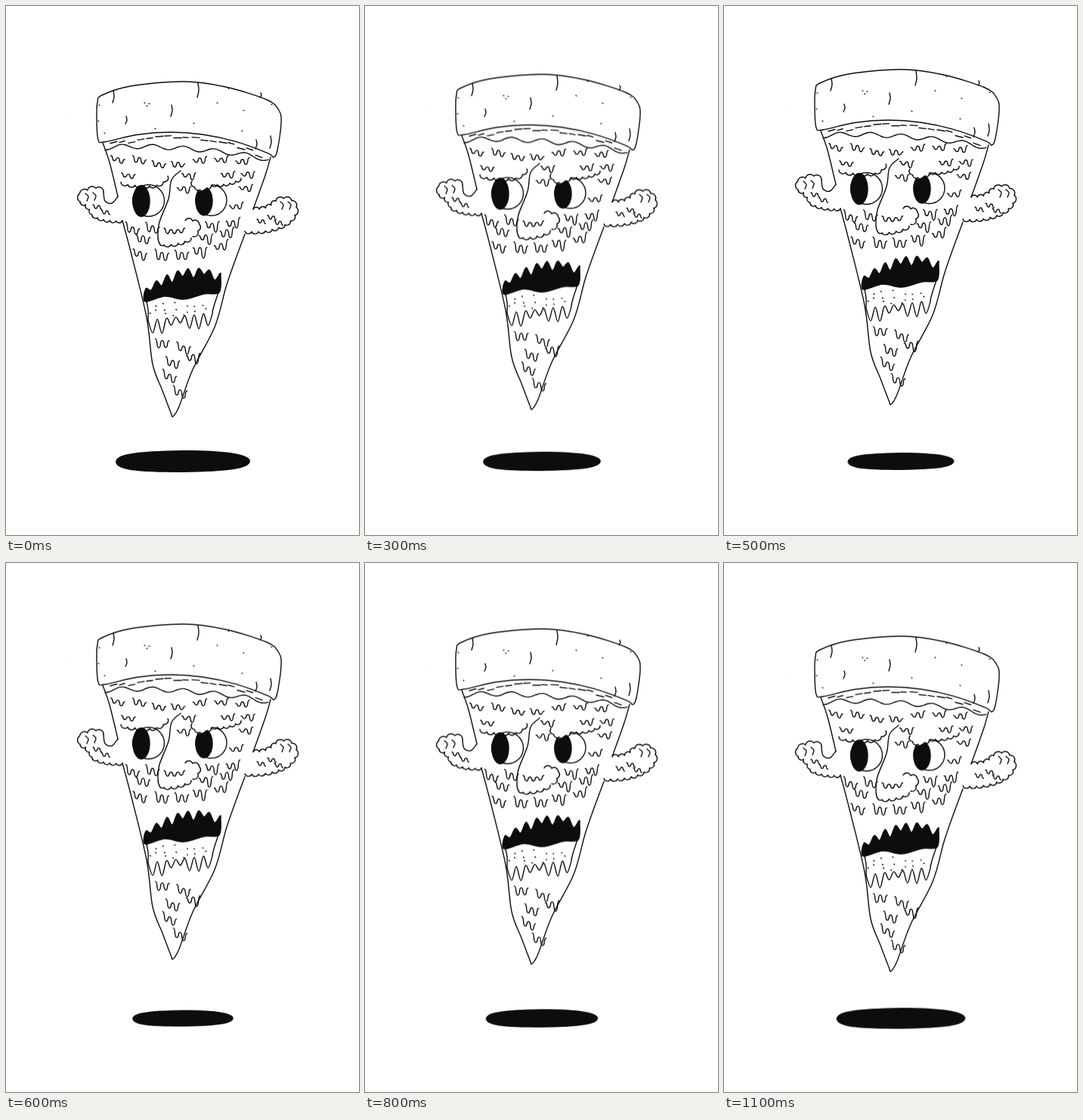
Animation, 467 px wide and 700 px high, one loop 1200 ms. Source, as an HTML page:

```html
<!DOCTYPE html>
<html lang="en">
<head>
<meta charset="utf-8">
<title>Floating pizza</title>
<style>
  html, body { margin: 0; width: 100%; height: 100%; overflow: hidden; background: #fff; }
  svg { display: block; width: 100vw; height: 100vh; }
  #pizza { fill: none; stroke: #0d0d0d; stroke-width: 1.4; stroke-linecap: round; stroke-linejoin: round;
           animation: rise 1200ms infinite; }
  .ink { fill: #0d0d0d; }
  .paper { fill: #fff; }
  #shadow { fill: #0d0d0d; transform-origin: 234px 602.5px; animation: shrink 1200ms infinite; }
  @keyframes rise {
    0%, 100% { transform: translateY(0); animation-timing-function: steps(6, end); }
    50% { transform: translateY(-19.2px); animation-timing-function: steps(6, end); }
  }
  @keyframes shrink {
    0%, 100% { transform: scale(1); animation-timing-function: steps(6, end); }
    50% { transform: scale(.75); animation-timing-function: steps(6, end); }
  }
</style>
</head>
<body>
<svg viewBox="0 0 467 700">
  <path id="shadow" d="M145 603C146 593 170 589 234 588C298 588 322 594 323 602C323 612 296 616 234 617C170 617 146 614 145 603Z"/>
  <g id="pizza">
    <circle cx="82" cy="149" r=".5" fill="#bbb" stroke="none"/>
    <g id="cheese"></g>
    <g id="eyes">
      <circle class="paper" cx="188.5" cy="257.5" r="21"/>
      <ellipse class="ink" cx="179" cy="258" rx="11" ry="20.5"/>
      <circle class="paper" cx="271.5" cy="257" r="20.5"/>
      <ellipse class="ink" cx="262" cy="258" rx="11" ry="19"/>
      <path class="paper" stroke="none" d="M246 232L251 243L258 245L273 236L268 228Z"/>
    </g>
    <g id="outline"></g>
  </g>
</svg>
<script>
const cheese = document.getElementById('cheese');
const outline = document.getElementById('outline');

let seed = 11;
function random(min, max) {
  seed = (seed * 16807) % 2147483647;
  return min + (max - min) * seed / 2147483647;
}

function addPath(d, parent = outline, cls = '') {
  const path = document.createElementNS('http://www.w3.org/2000/svg', 'path');
  path.setAttribute('d', d);
  path.setAttribute('class', cls);
  parent.append(path);
  return path;
}

// Smooth line through the given points
function curve(pts, closed = false, cls) {
  const len = pts.length;
  const at = i => closed ? pts[(i + len) % len] : pts[Math.max(0, Math.min(len - 1, i))];
  let d = 'M' + pts[0];
  for (let i = 0; i < (closed ? len : len - 1); i++) {
    const [a, b, c, e] = [at(i - 1), at(i), at(i + 1), at(i + 2)];
    d += `C${b.map((v, k) => v + (c[k] - a[k]) / 6)} ${c.map((v, k) => v - (e[k] - b[k]) / 6)} ${c}`;
  }
  addPath(d + (closed ? 'Z' : ''), outline, cls);
}

// Row of round bumps along a guide path
function bumps(guide, count, sweep) {
  const path = addPath(guide);
  const total = path.getTotalLength();
  const start = path.getPointAtLength(0);
  let d = `M${start.x} ${start.y}`;
  for (let i = 1; i <= count; i++) {
    const p = path.getPointAtLength(total * i / count);
    const r = total / count * .54;
    d += `A${r} ${r} 0 0 ${sweep} ${p.x} ${p.y}`;
  }
  path.setAttribute('d', d);
}

// Melted edge: falls and climbs in turn
function drip(x, y, moves, step = 4.6) {
  addPath(`M${x} ${y}` + moves.map(m => `c${step * .8} 0 ${step * .2} ${m} ${step} ${m}`).join(''), cheese);
}

function dot(x, y) {
  addPath(`M${x} ${y}l.9 .5`);
}

function plot(f, from, to, step) {
  const pts = [];
  for (let x = from; x <= to; x += step) pts.push([x, f(x)]);
  return pts;
}

// Crust
const crustEdge = x => 167 + .00168 * (x - 218) ** 2;
curve([[121, 127], [127, 118], [165, 106], [235, 100], [290, 107], [345, 124], [361, 138], [364, 155],
       [359, 191], [354, 200], ...plot(crustEdge, 131, 346, 43).reverse(), [122, 177], [120, 150]], true);
for (const [x, y, length] of [[142, 112, 16], [254, 102, 19], [219, 131, 15], [159, 146, 10],
                              [337, 115, 6], [331, 177, 12], [350, 172, 16]]) {
  curve([[x, y], [x + 1, y + length / 2], [x - 1, y + length]]);
}
for (const [x, y] of [[183, 128], [189, 129], [186, 132], [279, 128], [248, 155], [314, 138], [312, 165],
                      [130, 168], [123, 131], [122, 152], [351, 130], [294, 109], [197, 162]]) dot(x, y);

// Sauce band
const sauceEdge = x => crustEdge(x) + 8 + 13 * Math.sin(Math.PI * (x - 131) / 218) + 3 * Math.sin(x / 6.5);
curve(plot(sauceEdge, 131, 349, 4.5));
for (let x = 138; x < 335; x += 12) {
  const y = crustEdge(x) + random(4, 10);
  addPath(`M${x} ${y}l${random(7, 11)} ${(x - 222) * .03}`);
}

// Body
curve([[128, 181], [137, 207], [148, 252]]);
curve([[154, 284], [165, 325], [186, 412], [194, 474], [207, 509], [218, 538], [221, 543], [229, 530],
       [247, 481], [276, 425], [291, 372], [303, 337], [316, 302]]);
curve([[350, 200], [343, 224], [327, 269]]);

// Arms: fist, upper side, lower side
bumps('M98 259Q92 246 105 246Q117 236 129 246', 4, 1);
curve([[129, 246], [131, 258], [140, 261], [148, 252]]);
bumps('M98 259Q112 264 111 274Q126 286 154 284', 8, 0);
bumps('M327 269Q346 271 357 258', 4, 1);
bumps('M357 258Q366 252 377 257Q388 264 382 277', 4, 1);
bumps('M382 277Q374 291 350 296Q335 300 316 298', 8, 1);
for (const [x, y] of [[105, 248], [115, 247], [363, 259], [373, 259]]) {
  curve([[x, y], [x + 4, y + 4], [x + 2, y + 10]]);
}
for (const [x, y] of [[115, 263], [126, 270], [332, 282], [346, 277], [355, 284]]) {
  drip(x, y, [5, -4, 5], 3.8);
}

// Brows and nose
bumps('M152 233Q160 238 178 237Q206 242 214 225', 7, 0);
bumps('M246 232Q252 252 273 236Q295 238 311 228', 9, 0);
curve([[231, 218], [219, 230], [215, 255], [203, 286], [201, 306], [204, 316], [209, 317]]);
bumps('M209 316Q230 316 245 307', 4, 0);
bumps('M237 284Q270 284 247 305', 4, 1);
drip(209, 294, [7, -5, 5, -5, 4, -6]);

// Mouth
const mouthTop = plot(x => {
  const u = (x - 185) / 98;
  return 374 - 81 * u + 61 * u * u;
}, 185, 283, 7).map(([x, y], i) => [x, i % 2 ? y + random(7, 13) : y]);
curve([[184, 391], ...mouthTop, [284, 357], [282, 379], [262, 381], [235, 388], [210, 384]], true, 'ink');

// Lower lip
curve([[186, 391], [188, 402], [188, 416]]);
curve([[281, 379], [276, 394], [273, 405]]);
curve(plot(x => 416 - (x - 188) * .12, 188, 274, 6.1)
  .map(([x, y], i) => [x, i % 2 ? y + random(6, 20) : y]));
for (let i = 0; i < 16; i++) dot(194 + i % 6 * 14 + random(-4, 4), 395 + Math.floor(i / 6) * 7 + random(-3, 3));

// Cheese: staggered rows of drips that keep clear of the face
const face = [[188, 254, 31, 34], [272, 254, 31, 32], [209, 270, 16, 52], [230, 300, 30, 22],
              [234, 372, 60, 36], [230, 407, 52, 30]];
const blocked = (x, y) => face.some(([cx, cy, rx, ry]) => ((x - cx) / rx) ** 2 + ((y - cy) / ry) ** 2 < 1);
const leftSide = y => 131 + (y - 190) * .245;
const rightSide = y => 349 - (y - 200) * .34;

for (let y = 201, row = 0; y < 510; y += 20, row++) {
  for (let x = leftSide(y) + 5 + row % 2 * 9; x < rightSide(y) - 20; x += random(24, 29)) {
    const top = y + random(-4, 5);
    if (top < sauceEdge(x) + 5 || blocked(x + 9, top + 7)) continue;
    const long = y < 270 ? 9 : 14;
    const fall = () => random(.6, 1) * long;
    const climb = () => -random(.4, .7) * long;
    const leansLeft = x < 226;
    drip(x, top, leansLeft ? [fall(), climb(), fall(), climb()] : [fall() * .6, climb(), fall(), -long]);
  }
}
</script>
</body>
</html>
```
